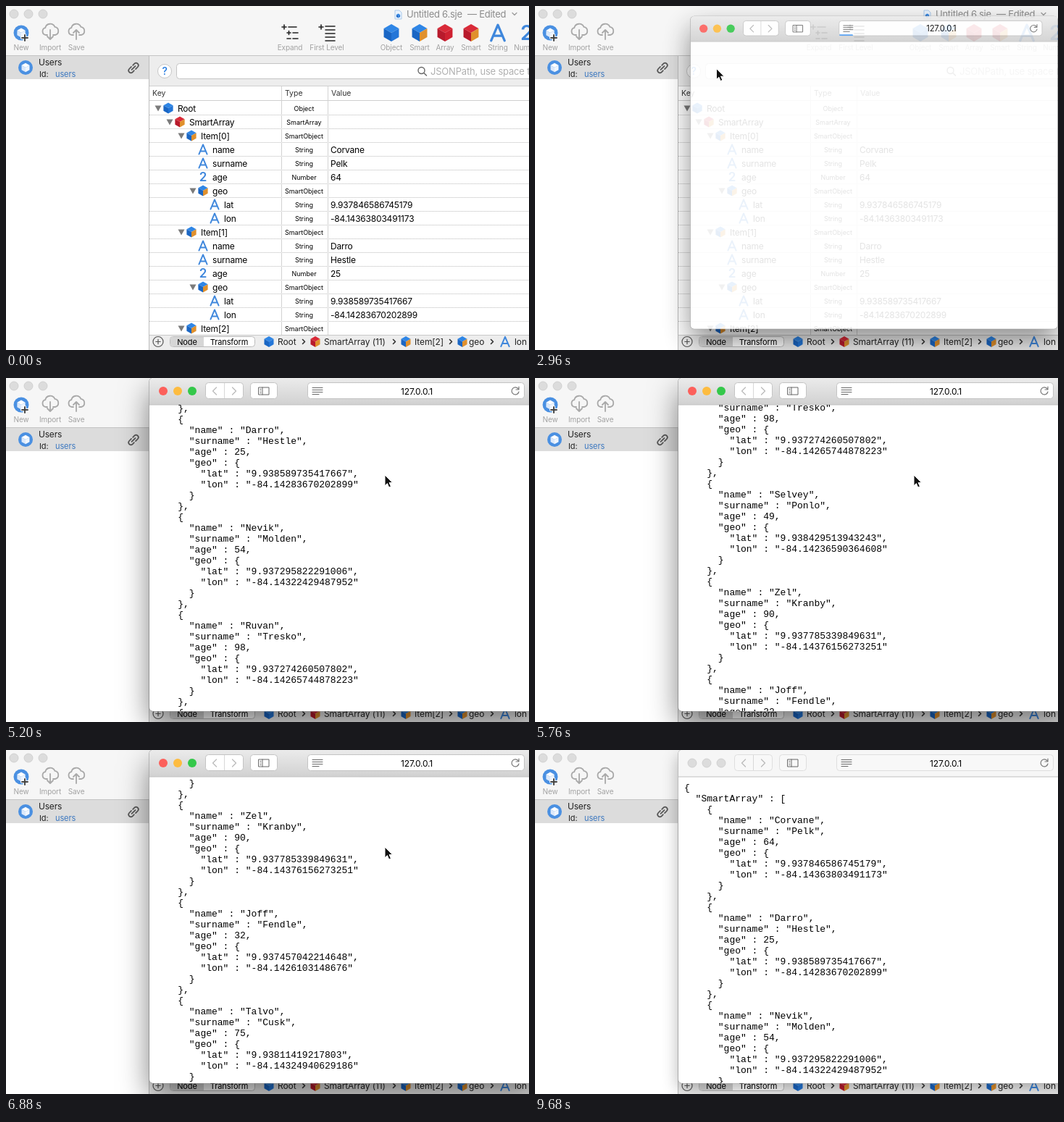
Animation of 722 by 475 pixels, one loop 9760 ms. Source, as an HTML page:

```html
<!DOCTYPE html>
<html lang="en">
<head>
<meta charset="utf-8">
<title>JSON editor served to a browser</title>
<style>
html, body { margin: 0; width: 100%; height: 100%; overflow: hidden; background: #fff; }
#stage { position: relative; width: 722px; height: 475px; overflow: hidden; font-family: Inter, "Open Sans", sans-serif; }
#stage > *, #web > * { position: absolute; }
svg { display: block; left: 0; top: 0; overflow: hidden; }
text { font-size: 12px; letter-spacing: -.2px; white-space: pre; }
.mid { text-anchor: middle; }
.label { font-size: 10px; letter-spacing: -.1px; text-anchor: middle; fill: #a2a2a2; }
.active .label { fill: #404040; }
.type { font-size: 9px; letter-spacing: 0; text-anchor: middle; }
.head { font-size: 10.5px; letter-spacing: 0; fill: #333; }
.foot { font-size: 11px; letter-spacing: -.1px; }
.crumb { letter-spacing: -.1px; fill: #222; }
.title { font-size: 13px; letter-spacing: -.25px; fill: #8c8c8c; }
.active .title.name { fill: #404040; }
.line { fill: none; stroke-linecap: round; stroke-linejoin: round; }
.ink { stroke: #a9a9a9; stroke-width: 1.8; }
.active .ink { stroke: #555; }
.bar { fill: #f6f6f6; }
.active .bar { fill: url(#grad); }
.light { fill: #dcdcdc; stroke: #cbcbcb; stroke-width: .8; }
.active .light { fill: var(--c); stroke: none; }
.row { fill: #dcdcdc; }
.active .row { fill: #0f63d8; }
.user { fill: #222; }
.link { fill: #3c78c0; }
.chain { stroke: #555; stroke-width: 1.7; }
.active .user, .active .link { fill: #d3e3fa; }
.active .chain { stroke: #fff; }
.pressed .chain { stroke: #9fc0f0; }
.seg { fill: #d6d6d6; }
.active .seg { fill: #747474; }
.active .node { fill: #fff; }
#menu { left: 167px; top: 73px; width: 260px; height: 76px; padding: 4px 0; border-radius: 6px; background: #f3f3f3;
  box-shadow: 0 0 0 .6px #b4b4b4, 0 6px 16px rgba(0, 0, 0, .3); font-size: 14px; letter-spacing: -.25px; color: #222; }
#menu div { padding-left: 22px; line-height: 19px; }
#menu .hot { color: #fff; background: linear-gradient(#4ea2fb, #2b82f2); }
#web { left: 198px; top: 0; width: 540px; height: 460px; border-radius: 5px; background: #fff;
  box-shadow: 0 0 0 .6px #b0b0b0, 0 8px 22px rgba(0, 0, 0, .3); }
#web.active { box-shadow: 0 0 0 .6px #999, 0 18px 40px rgba(0, 0, 0, .5); }
#page { left: 0; top: 37px; width: 540px; height: 423px; overflow: hidden; border-radius: 0 0 5px 5px; }
pre { margin: 0; padding: 8px 0 0 8px; font: 13px/15px "Liberation Mono", monospace; color: #000; }
.btn { fill: #f8f8f8; stroke: #dedede; }
.active .btn { fill: #fff; stroke: #c4c4c4; }
</style>
</head>
<body>
<div id="stage">
  <svg id="app" width="722" height="475"></svg>
  <div id="menu"></div>
  <div id="web">
    <svg id="chrome" width="540" height="38"></svg>
    <div id="page"><pre id="json"></pre></div>
  </div>
  <svg id="cursor" width="16" height="22" viewBox="-2 -2 16 22">
    <path d="M0 0V14.8L3.4 11.6 5.7 17 8.4 15.8 6.1 10.6H10.6Z" fill="#111" stroke="#fff"/>
  </svg>
</div>
<script>
const $ = id => document.getElementById(id);
const LOOP = 9760, STEP = 80;
const BLUE = ['#2f86e6', '#1a66c4', '#2376d8'], RED = ['#d92a38', '#b81a2c', '#cf2131'], PALE = ['#fff', '#dce9fa', '#f0f6fe'];
const ORANGE = '#e0902c';
const smart = c => [c[0], c[1], ORANGE];

// name, surname, age, lat, lon
const people = [
  ['Corvane', 'Pelk', 64, '9.937846586745179', '-84.14363803491173'],
  ['Darro', 'Hestle', 25, '9.938589735417667', '-84.14283670202899'],
  ['Nevik', 'Molden', 54, '9.937295822291006', '-84.14322429487952'],
  ['Ruvan', 'Tresko', 98, '9.937274260507802', '-84.14265744878223'],
  ['Selvey', 'Ponlo', 49, '9.938429513943243', '-84.14236590364608'],
  ['Zel', 'Kranby', 90, '9.937785339849631', '-84.14376156273251'],
  ['Joff', 'Fendle', 32, '9.937457042214648', '-84.1426103148676'],
  ['Talvo', 'Cusk', 75, '9.93811419217803', '-84.14324940629186'],
  ['Ombry', 'Vextal', 41, '9.937630518204417', '-84.14301852206413']
];

const text = (x, y, s, cls = '') => `<text x="${x}" y="${y}" class="${cls}">${s}</text>`;
const rect = (x, y, w, h, attrs) => `<rect x="${x}" y="${y}" width="${w}" height="${h}" ${attrs}/>`;
const disc = (x, y, r, attrs) => `<circle cx="${x}" cy="${y}" r="${r}" ${attrs}/>`;
const path = (x, y, d, attrs) => `<path transform="translate(${x} ${y})" d="${d}" ${attrs}/>`;
const stroke = (x, y, d, color, w = 1) => path(x, y, d, `class="line" stroke="${color}" stroke-width="${w}"`);

function cube(x, y, r, [top, left, right]) {
  const w = r * .87, h = r / 2;
  return path(x, y, `M0 ${-r}L${w} ${-h} 0 0 ${-w} ${-h}Z`, `fill="${top}"`) +
    path(x, y, `M${-w} ${-h}L0 0V${r}L${-w} ${h}Z`, `fill="${left}"`) +
    path(x, y, `M${w} ${-h}L0 0V${r}L${w} ${h}Z`, `fill="${right}"`);
}
const letterA = (x, y, k) => stroke(x, y, `M${-6 * k} ${7 * k}L0 ${-7 * k} ${6 * k} ${7 * k}M${-4 * k} ${2.6 * k}H${4 * k}`, '#3f87dc', 2.1 * k);
const digit = (x, y, size) => `<text x="${x}" y="${y + size * .36}" class="mid" fill="#3f87dc" style="font-size:${size}px;font-weight:600">2</text>`;
const lights = (x, y) => ['#fc605b', '#fdbc40', '#34c84a']
  .map((c, i) => disc(x + 20 * i, y, 6, `class="light" style="--c:${c}"`)).join('');

function toolbar() {
  const cloud = 'M-4 6H-6a5 5 0 0 1-.8-9.8a7 7 0 0 1 13.2-1.4a5.7 5.7 0 0 1 .4 11.2H4';
  const labels = [[21, 'New'], [61, 'Import'], [97, 'Save'], [392, 'Expand'], [443, 'First Level'], [532, 'Object'],
    [571, 'Smart'], [606, 'Array'], [642, 'Smart'], [679, 'String'], [720, 'Number']];
  return rect(0, 0, 722, 69, 'class="bar"') + rect(0, 68, 722, 1, 'fill="#c4c4c4"') + lights(11, 11) +
    path(537, 6, 'M0 0H6L9 3V12H0Z', 'fill="#eaf3fd" stroke="#9bbfe8" stroke-width=".8"') + cube(541.5, 13.5, 3, BLUE) +
    text(553, 16, 'Untitled 6.sje', 'title name') + text(637, 16, '— Edited', 'title') +
    stroke(702, 11, 'M-3-1.5L0 1.5 3-1.5', '#999', 1.2) +
    disc(21, 37, 10.5, 'fill="#4a90e2"') + cube(21, 37, 6.5, PALE) +
    stroke(26, 44, 'M-4 0H4M0-4V4', '#fff', 4) + stroke(26, 44, 'M-4 0H4M0-4V4', '#444', 2) +
    path(61, 34, cloud + 'M0-1V12M-4 8L0 12 4 8', 'class="line ink"') +
    path(97, 34, cloud + 'M0 12V-1M-4 3L0-1 4 3', 'class="line ink"') +
    stroke(392, 37, 'M-11-8H-5M-8-11V-5M-2-8H9M-4 0H1M-1.5-2.5V2.5M4 0H11M-4 8H1M4 8H11', '#222', 1.6) +
    stroke(443, 37, 'M-11-8H-5M-8-11V-5M-2-9H11M-2-4H11M-2 1H11M-2 6H11M-2 11H11', '#222', 1.6) +
    cube(532, 37, 12, BLUE) + cube(571, 37, 12, smart(BLUE)) + cube(606, 37, 12, RED) + cube(642, 37, 12, smart(RED)) +
    letterA(679, 37, 1.55) + digit(719, 37, 29) +
    labels.map(([x, s]) => text(x, 61, s, 'label')).join('');
}

function sidebar() {
  return rect(0, 69, 197, 406, 'fill="#fff"') + rect(0, 69, 197, 32, 'class="row"') +
    disc(27, 85, 10, 'fill="#4a90e2"') + cube(27, 85, 6.3, PALE) +
    text(45, 81.5, 'Users', 'user') + text(46, 98, 'Id:', 'foot user') + text(68, 98, 'users', 'foot link') +
    `<g transform="translate(176 85.5) rotate(-45)"><path class="line chain" d="M-1-3.2H-5a3.2 3.2 0 0 0 0 6.4H-2M1 3.2H5a3.2 3.2 0 0 0 0-6.4H2M-3.5 0H3.5"/></g>` +
    rect(197, 69, 1, 406, 'fill="#bdbdbd"');
}

function tree() {
  const rows = [[0, 'Root', 'Object', '', BLUE], [1, 'SmartArray', 'SmartArray', '', smart(RED)]];
  people.slice(0, 3).forEach(([name, surname, age, lat, lon], i) => rows.push(
    [2, `Item[${i}]`, 'SmartObject', '', smart(BLUE)],
    [3, 'name', 'String', name], [3, 'surname', 'String', surname], [3, 'age', 'Number', age],
    [3, 'geo', 'SmartObject', '', smart(BLUE)], [4, 'lat', 'String', lat], [4, 'lon', 'String', lon]));
  let out = rect(198, 110, 524, 344, 'fill="#fff"') + rect(198, 110, 524, 1, 'fill="#d0d0d0"') +
    rect(198, 130, 524, 1, 'fill="#cfcfcf"') +
    text(202, 124, 'Key', 'head') + text(385, 124, 'Type', 'head') + text(449, 124, 'Value', 'head');
  rows.slice(0, 17).forEach(([level, key, type, value, faces], i) => {
    const y = 141 + 19 * i, x = 224 + 16 * level;
    out += `<path d="M198 ${y + 9.5}H722" stroke="#bbb" stroke-dasharray="1 1"/>`;
    if (faces) out += path(x - 14, y, 'M-4.5-3.5H4.5L0 4.5Z', 'fill="#7b7b7b"') + cube(x, y, 7.6, faces);
    else out += type === 'Number' ? digit(x, y, 17) : letterA(x, y, .93);
    out += text(x + 13, y + 4.5, key) + text(411.5, y + 4, type, 'type') + text(448, y + 4.5, value);
  });
  return out + rect(380, 111, 1, 343, 'fill="#d2d2d2"') + rect(444, 111, 1, 343, 'fill="#d2d2d2"');
}

function panels() {
  const search = disc(219, 90, 9.5, 'fill="#fff" stroke="#c6c6c6"') +
    '<text x="219" y="95" class="mid" fill="#1f78e0" style="font-size:14px;font-weight:500">?</text>' +
    rect(235.5, 79.5, 500, 21, 'rx="4" fill="#fff" stroke="#c4c4c4"') +
    stroke(573.5, 89, 'M4.5 0A4.5 4.5 0 1 1-4.5 0A4.5 4.5 0 1 1 4.5 0M3.4 3.4L7 7', '#666', 1.4) +
    '<text x="586" y="95" fill="#b0b0b0" style="font-size:13px">JSONPath, use space to separate</text>';
  const crumbs = [[375, 'Root'], [439, 'SmartArray (11)'], [564, 'Item[2]'], [639, 'geo'], [702, 'lon']];
  const foot = rect(198, 454, 524, 21, 'fill="#ededed"') + rect(198, 454, 524, 1, 'fill="#c8c8c8"') +
    stroke(210, 463.5, 'M7 0A7 7 0 1 1-7 0A7 7 0 1 1 7 0M-3.2 0H3.2M0-3.2V3.2', '#555', 1.2) +
    rect(226.5, 456.5, 117, 14, 'rx="4" fill="#fff" stroke="#bcbcbc"') +
    path(227, 457, 'M4 0H46V13H4a4 4 0 0 1-4-4V4a4 4 0 0 1 4-4Z', 'class="seg"') +
    text(250, 468, 'Node', 'foot mid node') + text(308, 468, 'Transform', 'foot mid') +
    crumbs.map(([x, s]) => text(x, 468, s, 'crumb')).join('') +
    [411, 536, 614, 671].map(x => stroke(x, 463.5, 'M-1.5-3L1.5 0-1.5 3', '#333', 1.6)).join('') +
    cube(363, 463.5, 7.5, BLUE) + cube(427, 463.5, 7.5, smart(RED)) +
    cube(552, 463.5, 7.5, smart(BLUE)) + cube(630, 463.5, 7.5, smart(BLUE)) + letterA(689, 463.5, .95);
  return rect(198, 69, 524, 41, 'fill="#ededed"') + search + tree() + foot;
}

$('app').innerHTML = '<defs><linearGradient id="grad" x2="0" y2="1"><stop stop-color="#ebebeb"/>' +
  '<stop offset="1" stop-color="#d1d1d1"/></linearGradient></defs>' + toolbar() + panels() + sidebar();

$('menu').innerHTML = ['127.0.0.1', '192.168.2.1', '10.8.0.177', '169.254.241.66']
  .map(ip => `<div>http://${ip}:8080/users</div>`).join('');

$('chrome').innerHTML = path(0, 0, 'M0 37V5a5 5 0 0 1 5-5H540V37Z', 'class="bar"') +
  rect(0, 36.5, 540, 1, 'fill="#c2c2c2"') + lights(19, 18) +
  rect(77.5, 6.5, 52, 22, 'rx="4" class="btn"') + rect(103, 7, 1, 21, 'fill="#d8d8d8"') +
  stroke(90, 18, 'M2.5-5L-2.5 0 2.5 5', '#bbb', 1.3) + stroke(117, 18, 'M-2.5-5L2.5 0-2.5 5', '#bbb', 1.3) +
  rect(139.5, 6.5, 37, 22, 'rx="4" class="btn"') +
  stroke(158, 18, 'M-7-5H7V5H-7ZM-2-5V5M-5-2.5H-4M-5 0H-4M-5 2.5H-4', '#666') +
  rect(218.5, 6.5, 299, 22, 'rx="4" class="btn"') +
  stroke(225, 18, 'M0-4.5H14M0-1.5H14M0 1.5H14M0 4.5H9', '#666') +
  text(369, 22.5, '127.0.0.1', 'mid') +
  stroke(505, 18, 'M4.5-2.5A5 5 0 1 0 5 1M5-6V-2H1', '#777', 1.2) +
  '<rect id="load" x="219" y="26.5" height="2" rx="1" fill="#4a9cf5"/>';

$('json').textContent = '{\n  "SmartArray" : [\n' + people.map(([name, surname, age, lat, lon]) =>
`    {
      "name" : "${name}",
      "surname" : "${surname}",
      "age" : ${age},
      "geo" : {
        "lat" : "${lat}",
        "lon" : "${lon}"
      }
    }`).join(',\n') + '\n  ]\n}';

// Eased value at t from [time, value] pairs.
function track(t, keys) {
  if (t <= keys[0][0]) return keys[0][1];
  for (let i = 1; i < keys.length; i++) {
    const [t0, a] = keys[i - 1], [t1, b] = keys[i];
    if (t < t1) {
      const u = (t - t0) / (t1 - t0);
      return a + (b - a) * u * u * (3 - 2 * u);
    }
  }
  return keys[keys.length - 1][1];
}

const cursorX = [[0, 650], [400, 66], [640, 66], [1120, 177], [1760, 177], [2000, 237], [2880, 237], [3440, 480],
  [4080, 519], [4480, 523], [7760, 523], [7920, 250], [8080, 250], [8400, -20]];
const cursorY = [[0, 480], [400, 88], [640, 88], [1120, 88], [1760, 88], [2000, 86], [2880, 86], [3440, 96],
  [4080, 103], [4480, 134], [7760, 134], [7920, 350], [8080, 350], [8400, 450]];
const scroll = [[4800, 0], [5840, 484], [6480, 711.6], [6800, 711.6], [7440, 0]];
const loading = [[2960, 20], [3440, 180], [4080, 298], [4480, 299]];

function draw(t) {
  const app = $('app').classList, web = $('web'), menu = $('menu');
  app.toggle('active', t >= 640 && t < 2720);
  app.toggle('pressed', t >= 1360 && t < 1520);

  menu.style.opacity = t < 1520 ? 0 : track(t, [[2560, 1], [2800, 0]]);
  menu.firstChild.classList.toggle('hot', t >= 1840 && t !== 2480);

  const open = track(t, [[2640, 0], [3040, 1]]);
  web.style.opacity = open;
  web.style.transform = `scale(${.4 + .6 * open})`;
  web.classList.toggle('active', t < 9680);
  $('load').setAttribute('width', t < 4480 ? track(t, loading) : 0);
  $('json').style.visibility = t >= 3200 ? 'inherit' : 'hidden';
  $('json').style.transform = `translateY(${-Math.round(track(t, scroll))}px)`;

  const x = track(t, cursorX), y = track(t, cursorY);
  $('cursor').style.transform = `translate(${x - 2}px, ${y - 2}px)`;
}

function tick() {
  draw(Math.floor(performance.now() % LOOP / STEP) * STEP);
  requestAnimationFrame(tick);
}
tick();
</script>
</body>
</html>
```
